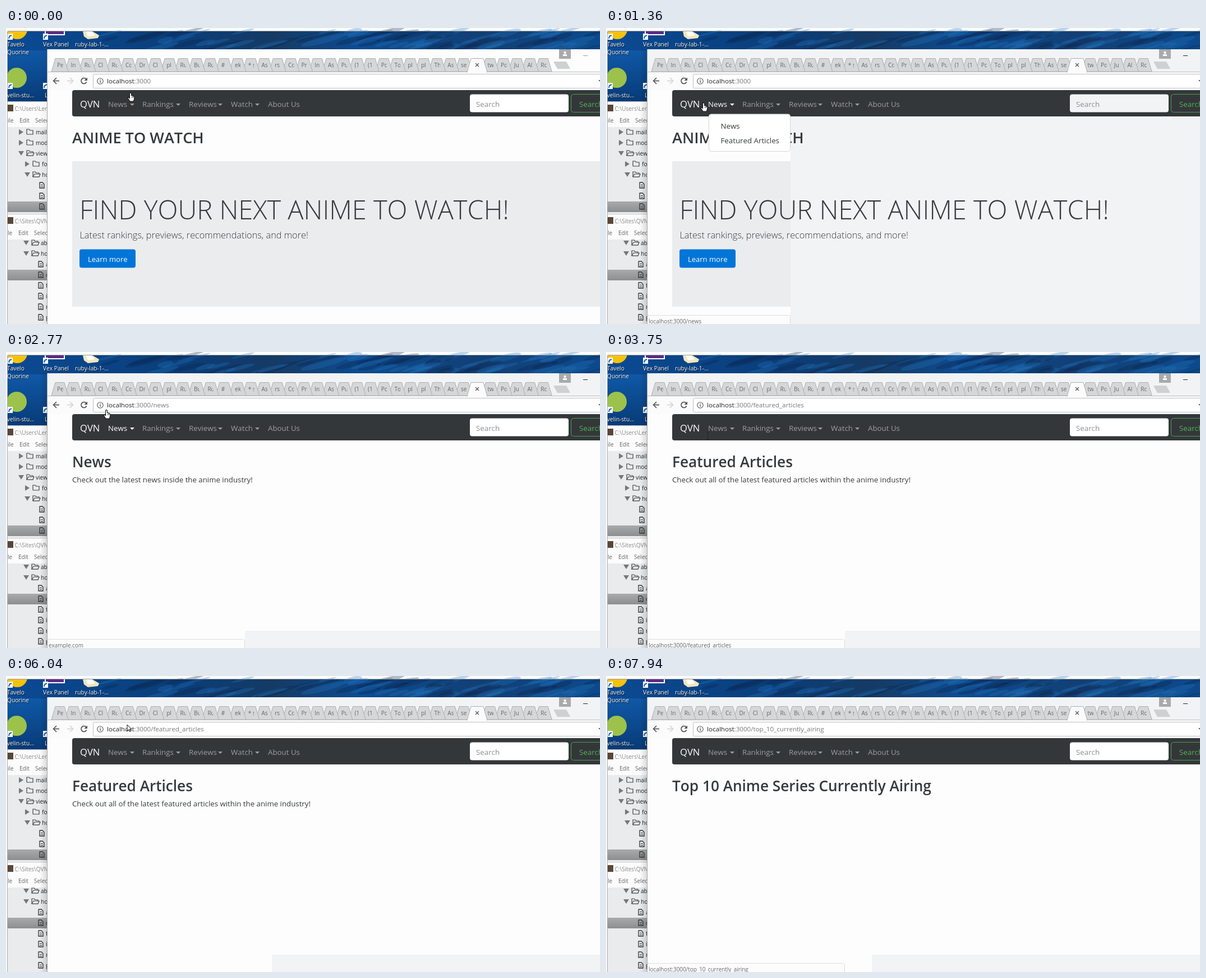
Animation of 1059x529 px, one loop 8000 ms. Source, as an HTML page with a canvas:

```html
<!DOCTYPE html>
<html lang="en">
<head>
<meta charset="utf-8">
<title>Browser demo</title>
<style>
  html, body { margin: 0; width: 100%; height: 100%; overflow: hidden; }
  canvas { display: block; }
</style>
</head>
<body>
<canvas id="stage" width="1059" height="529"></canvas>
<script>
const W = 1059, H = 529, LOOP = 8000, HOST = 'localhost:3000';
const c = document.getElementById('stage').getContext('2d');
const FONT = '"Open Sans", "Noto Sans", sans-serif';
const INK = '#373a3c', HAZE = '#f2f3f5', PANEL = '#e9ebed';

const NAV = [['News', 182, 221], ['Rankings', 243, 303], ['Reviews', 326, 378], ['Watch', 401, 444], ['About Us', 467]];
const MENUS = {
  News: [183, 146, ['News', 'Featured Articles']],
  Rankings: [243, 186, ['Top 10 Currently Airing', 'Top 10 Last Season', 'Top 25 of 2016']]
};
const PAGES = {
  home: ['', 'ANIME TO WATCH', ''],
  news: ['/news', 'News', 'Check out the latest news inside the anime industry!'],
  featured: ['/featured_articles', 'Featured Articles', 'Check out all of the latest featured articles within the anime industry!'],
  top: ['/top_10_currently_airing', 'Top 10 Anime Series Currently Airing', '']
};
const TABS = 'Pe|In|Ru|Cl|Ru|Co|Dr|Cl|pl|Ru|Bu|Ru|#|ek|* s|As|rs|Co|Pr|In|As|Pu|(1|(1|Pc|To|pl|pl|Th|As|se||tw|Po|Ju|Al|Ro'.split('|');
const ACTIVE_TAB = 31;

// time, page, lit nav item, open menu?, status text
const LINK = 'example.com';
const STATES = [
  [0, 'home', '', 0, ''],
  [400, 'home', 'News', 0, LINK],
  [520, 'home', 'News', 1, LINK],
  [800, 'home', 'News', 1, HOST + '/news'],
  [960, 'home', 'News', 1, HOST + '/featured_articles'],
  [1230, 'home', 'News', 1, HOST + '/news'],
  [1950, 'news', '', 0, HOST + '/news'],
  [2350, 'news', 'News', 0, LINK],
  [3070, 'news', 'News', 1, LINK],
  [3350, 'news', 'News', 1, HOST + '/featured_articles'],
  [3600, 'featured', '', 0, HOST + '/featured_articles'],
  [4170, 'featured', 'News', 0, LINK],
  [4400, 'featured', 'Rankings', 0, LINK],
  [4550, 'featured', 'Rankings', 1, LINK],
  [4820, 'featured', 'Rankings', 1, HOST + '/top_10_currently_airing'],
  [5560, 'featured', 'Rankings', 1, LINK],
  [5800, 'featured', '', 0, ''],
  [6800, 'featured', 'Rankings', 0, LINK],
  [7450, 'featured', 'Rankings', 1, HOST + '/top_10_currently_airing'],
  [7790, 'top', '', 0, HOST + '/top_10_currently_airing']
];

// time, pointer shape, tip x, tip y
const POINTER = [
  [0, hand, 222, 115], [120, hand, 214, 112], [480, hand, 182, 108], [800, hand, 178, 138],
  [1090, hand, 178, 158], [1230, hand, 176, 146], [1360, hand, 174, 133], [1950, arrow, 174, 133],
  [2350, hand, 177, 118], [2770, hand, 179, 103], [3070, hand, 179, 108], [3400, hand, 179, 153],
  [3600, ibeam, 180, 153], [4020, ibeam, 184, 140], [4170, hand, 196, 115], [4400, hand, 220, 108],
  [4600, hand, 222, 110], [4960, hand, 229, 135], [5260, hand, 229, 135], [5800, arrow, 222, 100],
  [6040, arrow, 216, 87], [6280, arrow, 216, 87], [6800, hand, 226, 106], [7310, hand, 232, 112],
  [7450, hand, 233, 120], [7600, hand, 237, 135], [7790, ibeam, 237, 138], [8000, ibeam, 237, 138]
];
const HOLDS = [1360, 4960];

function at(list, t) {
  let i = list.length - 1;
  while (list[i][0] > t) i--;
  return i;
}
function rect(x, y, w, h, fill) { c.fillStyle = fill; c.fillRect(x, y, w, h); }
function text(s, x, y, size, color, weight = 400) {
  c.font = `${weight} ${size}px ${FONT}`;
  c.fontKerning = 'none';
  c.fillStyle = color;
  c.fillText(s, x, y);
}
function shape(points, fill, stroke, width = 1) {
  c.beginPath();
  points.forEach(([x, y]) => c.lineTo(x, y));
  if (fill) { c.closePath(); c.fillStyle = fill; c.fill(); }
  if (stroke) { c.strokeStyle = stroke; c.lineWidth = width; c.stroke(); }
}
function box(x, y, w, h, r, fill, stroke) {
  c.beginPath();
  c.roundRect(x, y, w, h, r);
  if (fill) { c.fillStyle = fill; c.fill(); }
  if (stroke) { c.strokeStyle = stroke; c.lineWidth = 1; c.stroke(); }
}
function disc(x, y, r, fill) {
  c.beginPath(); c.arc(x, y, r, 0, 7); c.fillStyle = fill; c.fill();
}
function clipTo(x, y, w, h, draw) {
  c.save(); c.beginPath(); c.rect(x, y, w, h); c.clip(); draw(); c.restore();
}

function wallpaper() {
  const g = c.createLinearGradient(0, 0, W, 0);
  [[0, '#0b4a94'], [.15, '#0a4487'], [.3, '#0b3d78'], [.45, '#153a64'], [.6, '#0d4c92'], [.8, '#123f74'], [1, '#0c4a8d']]
    .forEach(([p, color]) => g.addColorStop(p, color));
  rect(0, 6, W, 126, g);
  let seed = 7;
  const rnd = () => (seed = seed * 16807 % 2147483647) / 2147483647;
  for (let i = 0; i < 70; i++) {
    c.fillStyle = rnd() < .5 ? 'rgba(10,35,70,.3)' : 'rgba(35,115,190,.3)';
    c.beginPath();
    c.ellipse(180 + rnd() * 880, 6 + rnd() * 32, 14 + rnd() * 28, 2 + rnd() * 4, -.25, 0, 7);
    c.fill();
  }
  const low = c.createLinearGradient(0, 40, 0, 131);
  low.addColorStop(0, 'rgba(20,105,190,.5)');
  low.addColorStop(1, 'rgba(5,45,95,.5)');
  rect(3, 40, 71, 91, low);
}
function shortcut(x, y) {
  rect(x, y, 9, 11, '#fff');
  shape([[x + 2, y + 9], [x + 3, y + 5], [x + 7, y + 3]], null, '#1565b5', 2);
}
function label(s, x, y) { text(s, x + 1, y + 1, 10.2, '#012'); text(s, x, y, 10.2, '#fff'); }

function desktop() {
  wallpaper();
  clipTo(3, 6, W, 126, () => {
    disc(20, 2, 18, '#f4c20d');
    rect(69, 4, 36, 9, '#fff'); rect(71, 4, 32, 7, '#5b2a86');
    shape([[137, 6], [154, 6], [166, 13], [164, 18], [146, 20], [139, 15]], '#f3e6bd');
    shape([[142, 6], [152, 6], [158, 13], [146, 15]], '#fff');
    disc(19, 89, 18, '#9cc24c');
    [[3, 10], [66, 10], [3, 98], [66, 98]].forEach(p => shortcut(...p));
    label('Tavelo', 2, 33); label('Quorine', 2, 47);
    label('Vex Panel', 66, 33);
    label('ruby-lab-1-...', 123, 33);
    label('velin-stu...', 2, 124); label('L', 69, 124);
  });
}

function twisty(x, y, open) {
  shape(open ? [[x - 1, y - 4], [x + 9, y - 4], [x + 4, y + 4]] : [[x, y - 5], [x + 8, y], [x, y + 5]], '#777');
}
function folder(x, y, open) {
  shape([[x, y + 4], [x, y - 5], [x + 4, y - 5], [x + 6, y - 3], [x + 11, y - 3], [x + 11, y + 4], [x, y + 4]], null, '#444', 1.2);
  if (open) shape([[x, y + 4], [x + 3, y - 1], [x + 13, y - 1], [x + 11, y + 4]], PANEL, '#444', 1.2);
}
function file(x, y) {
  shape([[x, y - 5], [x + 5, y - 5], [x + 8, y - 2], [x + 8, y + 5], [x, y + 5], [x, y - 5.5]], null, '#333', 1.3);
  [-1, 2].forEach(d => rect(x + 2, y + d, 4, 1, '#333'));
}
function row(y, x, name, open) {
  twisty(x, y, open); folder(x + 14, y, open); text(name, x + 30, y + 4, 10, '#222');
}
function editor(top, path, menu, selected) {
  rect(3, top, 71, 46, '#fcfcfc');
  rect(3, top, 71, 1, '#bbb');
  rect(2, top + 6, 11, 12, '#5a4638');
  text(path, 15.5, top + 17, 10, '#888');
  menu.forEach(([s, x]) => text(s, x, top + 38, 10, '#666'));
  rect(3, top + 46, 71, 154, PANEL);
  const g = c.createLinearGradient(0, selected, 0, selected + 19);
  g.addColorStop(0, '#a9aaab'); g.addColorStop(1, '#8d8e90');
  rect(3, selected, 71, 19, g);
}
function editors() {
  clipTo(0, 131, 74, 398, () => {
    editor(131, 'C:\\Users\\Lem', [['ile', 3], ['Edit', 24], ['Selection', 52]], 310);
    row(186, 23, 'mailers'); row(205, 23, 'models'); row(224, 23, 'views', true);
    row(243, 34, 'foo'); row(262, 34, 'home', true);
    [281, 300, 319].forEach(y => file(60, y));
    editor(332, 'C:\\Sites\\QVN', [['le', 3], ['Edit', 22], ['Selection', 50]], 432);
    row(384, 32, 'about', true); row(403, 32, 'home', true);
    [...'acfinp'].forEach((s, i) => { file(58, 422 + 19 * i); text(s, 71, 426 + 19 * i, 10, '#222'); });
  });
}

// Drawn from right to left, so that each tab covers the left edge of the next.
function tabs() {
  for (let i = TABS.length - 1; i >= 0; i--) {
    if (i === ACTIVE_TAB) continue;
    const x = 91 + Math.min(24.4 * i, 9 + 23.7 * i);
    shape([[x - 10, 78], [x - 3, 54.5], [x + 13, 54.5], [x + 20, 78]], '#d6d7d8', '#adaeb0');
    clipTo(x - 1, 54, 11.5, 24, () => text(TABS[i], x, 69.5, 10, '#666'));
  }
  rect(74, 78, W, 1, '#b9babc');
  shape([[822, 79], [829, 54.5], [851, 54.5], [858, 79]], '#fbfbfb', '#adaeb0');
  rect(823, 78, 34, 2, '#fbfbfb');
  shape([[837, 63], [843, 69]], null, '#555', 1.3);
  shape([[843, 63], [837, 69]], null, '#555', 1.3);
  shape([[976, 60], [999, 60], [1006, 73], [983, 73]], '#cfd0d1');
}
function chrome(url, active) {
  const shade = c.createLinearGradient(60, 0, 74, 0);
  shade.addColorStop(0, 'rgba(0,0,0,0)');
  shade.addColorStop(1, `rgba(0,0,0,${active ? .14 : .05})`);
  rect(60, 38, 14, 491, shade);
  rect(74, 38, W, 40, active ? HAZE : '#fdfdfd');
  rect(74, 78, W, 33, '#fbfbfb');
  tabs();
  rect(986, 38, 21, 17, '#a9aaab');
  disc(996.5, 44, 2.2, '#fff'); rect(993, 47, 7, 3, '#fff');
  rect(1029, 49, 8, 1, active ? '#222' : '#999');

  shape([[95, 94.5], [85, 94.5]], null, '#555', 1.7);
  shape([[90, 89], [84.5, 94.5], [90, 100]], null, '#555', 1.7);
  shape([[109, 94.5], [119, 94.5]], null, '#d3d4d5', 1.7);
  shape([[114, 89], [119.5, 94.5], [114, 100]], null, '#d3d4d5', 1.7);
  c.beginPath(); c.arc(139, 94.5, 5, .4, 5.6); c.strokeStyle = '#555'; c.lineWidth = 1.7; c.stroke();
  shape([[145, 88.5], [145, 94], [139.5, 94]], '#555');
  box(155.5, 82.5, 920, 25, 2, '#fff', '#bfc0c2');
  c.beginPath(); c.arc(168, 95, 5.2, 0, 7); c.strokeStyle = '#555'; c.lineWidth = 1.1; c.stroke();
  rect(167.4, 94, 1.3, 4, '#555'); rect(167.4, 92, 1.3, 1.3, '#555');
  text('localhost', 180, 99, 11.6, '#222');
  const w = c.measureText('localhost').width;
  text(':3000' + url, 180 + w, 99, 11.6, '#777');
  shape([[1056, 93], [1062, 93], [1059, 96]], '#555');
}

function navbar(lit, field) {
  box(118, 111, 980, 47, 4, '#34373a');
  text('QVN', 132, 141.5, 16.6, '#fff');
  NAV.forEach(([s, x, caret]) => {
    const color = s === lit ? '#fff' : '#9b9c9d';
    text(s, x, 141, 13.3, color);
    if (caret) shape([[caret, 135], [caret + 8, 135], [caret + 4, 139]], color);
  });
  box(827, 118.5, 176, 32, 4, field);
  text('Search', 838, 141, 13.3, '#8b8f93');
  box(1007.5, 118.5, 80, 32, 4, null, '#479f4c');
  text('Search', 1022, 141, 13.3, '#50b254');
}
function page(name, s, t) {
  const [, title, lead] = PAGES[name], home = name === 'home';
  const hazy = home && t >= 120;
  rect(74, 111, W, 418, '#fdfdfd');
  if (home) {
    rect(118, 238, W, 260, '#ebecee');
    if (hazy) rect(t >= 520 ? 329 : 74, 111, W, 418, HAZE);
    text('FIND YOUR NEXT ANIME TO WATCH!', 131, 342, 47, INK, 300);
    text('Latest rankings, previews, recommendations, and more!', 131.5, 376, 16.3, INK, 300);
    box(131, 395.5, 100, 33, 4, '#0275d8');
    text('Learn more', 146, 418, 13, '#fff');
  } else {
    rect(t < 4550 ? 426 : t < 5260 ? 428 : 474, 498, W, 31, HAZE);
  }
  text(title, 118, 206, home ? 27.1 : 26.2, INK, 600);
  text(lead, 118, 233, 13.26, INK);
  navbar(s[2], hazy ? HAZE : '#fff');
}
function dropdown(name) {
  const [x, w, items] = MENUS[name];
  box(x + .5, 154, w - 1, 13.5 + 26.5 * items.length, 4, '#fff', '#d5d6d7');
  items.forEach((item, i) => text(item, x + 21.5, 180 + 26.4 * i, 13.3, INK));
}
function status(s, right) {
  box(73.5, 513.5, right - 74, 20, [0, 3, 0, 0], '#fcfcfc', '#dcddde');
  text(s, 76, 527.5, 9.9, '#666');
}

function hand(x, y) {
  shape([[x - 1.5, y + 1.5], [x, y + .5], [x + 1.5, y + 1.5], [x + 1.5, y + 5.5], [x + 4, y + 6], [x + 6.5, y + 7.5],
    [x + 7, y + 10], [x + 5.5, y + 16], [x - 1, y + 16], [x - 5, y + 10], [x - 4, y + 8.5], [x - 1.5, y + 10.5], [x - 1.5, y + 1.5]],
    '#fff', '#111', 1.1);
  [2, 4.3].forEach(d => rect(x + d, y + 7, .8, 3, '#222'));
}
function arrow(x, y) {
  shape([[x, y], [x, y + 11], [x + 2.5, y + 8.8], [x + 4.3, y + 12.5], [x + 6, y + 11.8], [x + 4.3, y + 8], [x + 7.8, y + 8], [x, y]],
    '#fff', '#111');
}
function ibeam(x, y) {
  rect(x, y - 5, 1, 11, '#222');
  [y - 6, y + 6].forEach(v => { rect(x - 2, v, 2, 1, '#222'); rect(x + 1, v, 2, 1, '#222'); });
}
function pointer(t) {
  const i = at(POINTER, t), a = POINTER[i], b = POINTER[i + 1];
  const steps = Math.max(1, Math.round((b[0] - a[0]) / 140));
  const p = HOLDS.includes(a[0]) ? 0 : Math.floor((t - a[0]) / (b[0] - a[0]) * steps) / steps;
  a[1](Math.round(a[2] + (b[2] - a[2]) * p), Math.round(a[3] + (b[3] - a[3]) * p));
}

function draw(t) {
  const s = STATES[at(STATES, t)];
  rect(0, 0, W, H, '#fdfdfd');
  desktop();
  editors();
  rect(3, 5, W, 1, '#9a9da0');
  rect(0, 6, 2, H, '#fdfdfd'); rect(2, 6, 1, H, '#a5a8ab');
  chrome(PAGES[s[1]][0], t >= 120);
  page(s[1], s, t);
  if (s[3]) dropdown(s[2]);
  if (s[4]) status(s[4], s[1] === 'home' ? 329 : 426);
  rect(73, 38, 1, 491, '#a5a7a9');
  pointer(t);
}

const start = performance.now();
function frame() {
  draw((performance.now() - start) % LOOP);
  requestAnimationFrame(frame);
}
frame();
</script>
</body>
</html>
```
